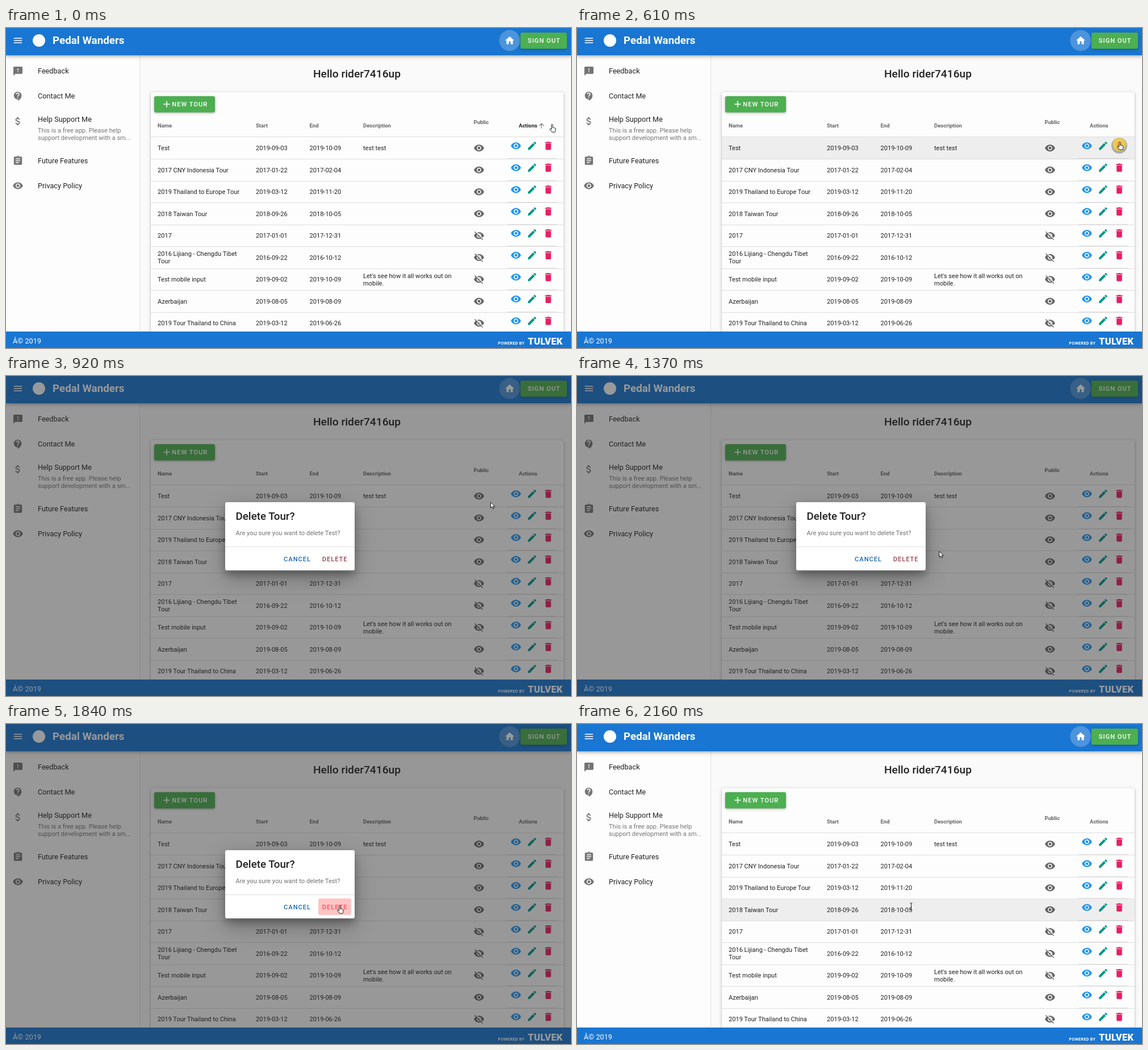
These frames come from a looping animation (995x563 px, 2.36 s). An HTML page:

```html
<!DOCTYPE html>
<html lang="en">
<head>
<meta charset="utf-8">
<title>Tour list</title>
<style>
html, body { margin: 0; width: 100%; height: 100%; overflow: hidden; background: #fafafa; }
svg { display: block; width: 995px; height: 563px; font-family: Roboto, Arial, sans-serif; }
text { white-space: pre; }
.lift { filter: drop-shadow(0 1.5px 1.5px rgba(0,0,0,.22)) drop-shadow(0 1px 3px rgba(0,0,0,.14)); }
.bar { filter: drop-shadow(0 2px 2px rgba(0,0,0,.18)) drop-shadow(0 2px 4px rgba(0,0,0,.16)); }
.deep { filter: drop-shadow(0 8px 7px rgba(0,0,0,.24)) drop-shadow(0 12px 18px rgba(0,0,0,.26)); }
</style>
</head>
<body>
<svg id="stage" viewBox="0 0 995 563"></svg>
<script>
const stage = document.getElementById('stage');
const BLUE = '#1976d2', GREEN = '#4caf50', DARK = 'rgba(0,0,0,.87)', SOFT = 'rgba(0,0,0,.54)';
const LOOP = 2360, SMALL = 11.06, SHADE = 0.46;

const icons = {
  menu: 'M3 18h18v-2H3v2zm0-5h18v-2H3v2zm0-7v2h18V6H3z',
  home: 'M10 20v-6h4v6h5v-8h3L12 3 2 12h3v8z',
  plus: 'M19 13h-6v6h-2v-6H5v-2h6V5h2v6h6z',
  up: 'M4 12l1.41 1.41L11 7.83V20h2V7.83l5.58 5.59L20 12l-8-8-8 8z',
  eye: 'M12 4.5C7 4.5 2.73 7.61 1 12c1.73 4.39 6 7.5 11 7.5s9.27-3.11 11-7.5c-1.73-4.39-6-7.5-11-7.5zM12 17c-2.76 0-5-2.24-5-5s2.24-5 5-5 5 2.24 5 5-2.24 5-5 5zm0-8c-1.66 0-3 1.34-3 3s1.34 3 3 3 3-1.34 3-3-1.34-3-3-3z',
  eyeOff: 'M12 7c2.76 0 5 2.24 5 5 0 .65-.13 1.26-.36 1.83l2.92 2.92c1.51-1.26 2.7-2.89 3.43-4.75-1.73-4.39-6-7.5-11-7.5-1.4 0-2.74.25-3.98.7l2.16 2.16C10.74 7.13 11.35 7 12 7zM2 4.27l2.28 2.28.46.46C3.08 8.3 1.78 10.02 1 12c1.73 4.39 6 7.5 11 7.5 1.55 0 3.03-.3 4.38-.84l.42.42L19.73 22 21 20.73 3.27 3 2 4.27zM7.53 9.8l1.55 1.55c-.05.21-.08.43-.08.65 0 1.66 1.34 3 3 3 .22 0 .44-.03.65-.08l1.55 1.55c-.67.33-1.41.53-2.2.53-2.76 0-5-2.24-5-5 0-.79.2-1.53.53-2.2zm4.31-.78l3.15 3.15.02-.16c0-1.66-1.34-3-3-3l-.17.01z',
  pencil: 'M3 17.25V21h3.75L17.81 9.94l-3.75-3.75L3 17.25zM20.71 7.04c.39-.39.39-1.02 0-1.41l-2.34-2.34c-.39-.39-1.02-.39-1.41 0l-1.83 1.83 3.75 3.75 1.83-1.83z',
  trash: 'M6 19c0 1.1.9 2 2 2h8c1.1 0 2-.9 2-2V7H6v12zM19 4h-3.5l-1-1h-5l-1 1H5v2h14V4z',
  feedback: 'M20 2H4c-1.1 0-1.99.9-1.99 2L2 22l4-4h14c1.1 0 2-.9 2-2V4c0-1.1-.9-2-2-2zm-7 12h-2v-2h2v2zm0-4h-2V6h2v4z',
  contact: 'M11.5 2C6.81 2 3 5.81 3 10.5S6.81 19 11.5 19h.5v3c4.86-2.34 8-7 8-11.5C20 5.81 16.19 2 11.5 2zm1 14.5h-2v-2h2v2zm0-3.5h-2c0-3.25 3-3 3-5 0-1.1-.9-2-2-2s-2 .9-2 2h-2c0-2.21 1.79-4 4-4s4 1.79 4 4c0 2.5-3 2.75-3 5z',
  money: 'M11.8 10.9c-2.27-.59-3-1.2-3-2.15 0-1.09 1.01-1.85 2.7-1.85 1.78 0 2.44.85 2.5 2.1h2.21c-.07-1.72-1.12-3.3-3.21-3.81V3h-3v2.16c-1.94.42-3.5 1.68-3.5 3.61 0 2.31 1.91 3.46 4.7 4.13 2.5.6 3 1.48 3 2.41 0 .69-.49 1.79-2.7 1.79-2.06 0-2.87-.92-2.98-2.1h-2.2c.12 2.19 1.76 3.42 3.68 3.83V21h3v-2.15c1.95-.37 3.5-1.5 3.5-3.55 0-2.84-2.43-3.81-4.7-4.4z',
  list: 'M19 3h-4.18C14.4 1.84 13.3 1 12 1c-1.3 0-2.4.84-2.82 2H5c-1.1 0-2 .9-2 2v14c0 1.1.9 2 2 2h14c1.1 0 2-.9 2-2V5c0-1.1-.9-2-2-2zm-7 0c.55 0 1 .45 1 1s-.45 1-1 1-1-.45-1-1 .45-1 1-1zm2 14H7v-2h7v2zm3-4H7v-2h10v2zm0-4H7V7h10v2z'
};

const rect = (x, y, w, h, fill, more = '') =>
  `<rect x="${x}" y="${y}" width="${w}" height="${h}" fill="${fill}" ${more}/>`;
const text = (x, y, size, str, fill = DARK, more = '') =>
  `<text x="${x}" y="${y}" font-size="${size}" fill="${fill}" ${more}>${str}</text>`;
const icon = (name, cx, cy, fill = SOFT, scale = 0.8, more = '') =>
  `<path d="${icons[name]}" fill="${fill}" transform="translate(${cx - 12 * scale} ${cy - 12 * scale}) scale(${scale})" ${more}/>`;
const caps = (x, y, str, fill, more = '') =>
  text(x, y, 11.2, str, fill, `font-weight="500" letter-spacing=".95" ${more}`);

// name, start, end, public, description
const tours = [
  ['Test', '2019-09-03', '2019-10-09', 1, 'test test'],
  ['2017 CNY Indonesia Tour', '2017-01-22', '2017-02-04', 1],
  ['2019 Thailand to Europe Tour', '2019-03-12', '2019-11-20', 1],
  ['2018 Taiwan Tour', '2018-09-26', '2018-10-05', 1],
  ['2017', '2017-01-01', '2017-12-31', 0],
  ['2016 Lijiang - Chengdu Tibet|Tour', '2016-09-22', '2016-10-12', 0],
  ['Test mobile input', '2019-09-02', '2019-10-09', 0, "Let's see how it all works out on|mobile."],
  ['Azerbaijan', '2019-08-05', '2019-08-09', 1],
  ['2019 Tour Thailand to China', '2019-03-12', '2019-06-26', 0]
];
const ROW = 38.5, TOP = 192;

function cell(x, mid, str = '') {
  const lines = str.split('|');
  return lines.map((s, i) => text(x, mid + 4 + (i - (lines.length - 1) / 2) * 13.4, SMALL, s)).join('');
}

function tourRow([name, start, end, open, note], i) {
  const y = TOP + i * ROW, mid = y + 19.2;
  return rect(255, y, 727, ROW, '#eee', `id="row${i}" opacity="0"`) +
    rect(255, Math.round(y + ROW - 0.5), 727, 1, 'rgba(0,0,0,.12)') +
    rect(883, Math.round(y + ROW - 1.5), 87, 1, 'rgba(0,0,0,.12)') +
    cell(267, mid, name) + cell(440, mid, start) + cell(534.5, mid, end) + cell(629, mid, note) +
    icon(open ? 'eye' : 'eyeOff', 833, mid, 'rgba(0,0,0,.6)') +
    (i ? '' : '<circle id="halo" cx="955" cy="207" r="14"/>') +
    icon('eye', 898, mid - 4, '#2196f3') + icon('pencil', 926.5, mid - 4, '#009688') +
    icon('trash', 955, mid - 4, '#e91e63');
}

const head = (x, y, str, more) => text(x, y, 9.5, str, 'rgba(0,0,0,.6)', `font-weight="700" ${more || ''}`);

const sidebar = rect(0, 47, 235, 487, '#fdfdfd') + rect(235, 47, 1, 487, '#e0e0e0') +
  [['feedback', 'Feedback', 76], ['contact', 'Contact Me', 120], ['money', 'Help Support Me', 164, -3],
   ['list', 'Future Features', 233.5], ['eye', 'Privacy Policy', 277.5]]
    .map(([name, str, y, dy = 0]) => icon(name, 21, y) + text(56, y + 4.2 + dy, 12.7, str)).join('') +
  text(56, 184, SMALL, 'This is a free app. Please help', SOFT) +
  text(56, 197, SMALL, 'support development with a sm...', SOFT);

const card = rect(255, 113, 727, 440, '#fdfdfd', 'rx="3" class="lift"') +
  rect(261, 120, 107, 28.5, GREEN, 'rx="3" class="lift"') +
  icon('plus', 283, 134, '#fff') + caps(292.3, 138.1, 'NEW TOUR', '#fff') +
  head(267, 175, 'Name') + head(440, 175, 'Start') + head(534.5, 175, 'End') +
  head(629, 175, 'Description') + head(823.5, 169, 'Public') +
  head(903, 175, 'Actions', 'id="sortText"') + icon('up', 943, 172, SOFT, 0.6, 'id="sortArrow"') +
  rect(255, 191, 727, 1, 'rgba(0,0,0,.12)') + tours.map(tourRow).join('');

const bars = rect(0, 0, 995, 48, BLUE, 'class="bar"') + icon('menu', 21, 22, '#fff') +
  '<circle cx="58" cy="22" r="11" fill="#fff"/>' +
  text(82, 28, 18.8, 'Pedal Wanders', '#fff', 'font-weight="700"') +
  '<circle cx="887" cy="22" r="18.5" fill="#fff" opacity=".22"/>' + icon('home', 887, 22, '#fff') +
  rect(906, 8, 82, 28.5, GREEN, 'rx="3" class="lift"') + caps(918.8, 26.3, 'SIGN OUT', '#fff') +
  rect(0, 534, 995, 29, BLUE) + text(12, 554.8, 12.7, 'Â© 2019', '#fff') +
  text(866.5, 556.5, 7.1, 'POWERED BY', '#fff', 'font-weight="700" letter-spacing=".35"') +
  text(919, 556.5, 16.6, 'TULVEK', '#fff', 'font-weight="900" letter-spacing=".3"');

const dialog = '<g id="dialog">' + rect(386, 222, 228, 120, '#fff', 'rx="3" class="deep"') +
  text(404.5, 253, 18.8, 'Delete Tour?', DARK, 'font-weight="500"') +
  text(404.5, 280, 11.15, 'Are you sure you want to delete Test?', 'rgba(0,0,0,.56)') +
  rect(386, 300, 228, 1, 'rgba(0,0,0,.12)') +
  rect(550, 307, 58, 29, '#ff5252', 'id="press" rx="3"') +
  caps(489, 325.7, 'CANCEL', '#1a67b5') + caps(556.7, 325.7, 'DELETE', '#98414c', 'id="confirm"') + '</g>';

const cursors = `<circle id="click" cx="955" cy="205" r="11.5" fill="#fdd835" opacity=".75"/>
  <g stroke="#000" stroke-width=".9" stroke-linejoin="round" fill="#fff">
  <path id="hand" d="M3.6 9.4V1.6a1.1 1.1 0 0 1 2.2 0V6.3q1.2-.6 1.8.3 1.2-.4 1.7.5 1.6-.3 1.6 1.3v2.4q0 1.5-1.2 3.4H4.6Q3 11.8 1 9.8q-.9-1.2.3-1.6.9-.2 2.3 1.2z"/>
  <path id="arrow" d="M.5.5V10.6L2.9 8.4 4.6 12.2 6.3 11.4 4.6 7.8H7.8z"/>
  <path id="beam" d="M-2-6H-.6L0-5.5.6-6H2M0-5.5V5.5M-2 6H-.6L0 5.5.6 6H2" fill="none"/></g>`;

stage.innerHTML = rect(0, 0, 995, 563, '#fafafa') + sidebar +
  text(618, 87, 19.2, 'Hello rider7416up', DARK, 'font-weight="500" text-anchor="middle"') +
  card + bars + rect(0, 0, 995, 563, '#212121', 'id="shade"') + dialog + cursors;

const part = id => document.getElementById(id);
const fade = (id, v) => part(id).setAttribute('opacity', v);

const steps = [
  { t: 0, cur: 'hand', x: 957, y: 169, sort: 1 },
  { t: 140, cur: 'hand', x: 957, y: 177, sort: 1 },
  { t: 290, cur: 'hand', x: 952, y: 198, sort: 0.5, row0: 1, halo: 0.12 },
  { t: 450, cur: 'hand', x: 951, y: 200, row0: 1, halo: 0.14 },
  { t: 610, cur: 'hand', x: 951, y: 200, row0: 1, halo: 0.28, click: 1 },
  { t: 760, cur: 'arrow', x: 955, y: 200, halo: 0.25, shade: 0.39, open: 0.84, scale: 0.914 },
  { t: 920, cur: 'arrow', x: 853, y: 221.5, shade: SHADE, open: 1 },
  { t: 1070, cur: 'arrow', x: 754, y: 265.5, shade: SHADE, open: 1 },
  { t: 1220, cur: 'arrow', x: 640, y: 307, shade: SHADE, open: 1 },
  { t: 1370, cur: 'arrow', x: 637.5, y: 308, shade: SHADE, open: 1 },
  { t: 1530, cur: 'hand', x: 589, y: 315, shade: SHADE, open: 1, press: 0.08 },
  { t: 1690, cur: 'hand', x: 583, y: 319, shade: SHADE, open: 1, press: 0.1 },
  { t: 1840, cur: 'hand', x: 583, y: 319, shade: SHADE, open: 1, press: 0.34 },
  { t: 2000, cur: 'beam', x: 588.5, y: 321, shade: 0.04, row3: 0.6 },
  { t: 2160, cur: 'beam', x: 588.5, y: 321, row3: 1 }
];

function draw(ms) {
  const s = steps.filter(step => step.t <= ms).pop();
  const { sort = 0, scale = 1, press = 0 } = s;
  for (const id of ['row0', 'row3', 'halo', 'shade', 'press']) fade(id, s[id] || 0);
  fade('click', s.click ? 0.75 : 0);
  fade('dialog', s.open || 0);
  fade('sortArrow', sort);
  part('sortText').setAttribute('fill', `rgba(0,0,0,${0.6 + 0.27 * sort})`);
  part('dialog').setAttribute('transform', `translate(500 282) scale(${scale}) translate(-500 -282)`);
  part('confirm').setAttribute('fill', press ? '#f9545a' : '#98414c');
  for (const id of ['hand', 'arrow', 'beam']) {
    fade(id, id === s.cur ? 1 : 0);
    part(id).setAttribute('transform', `translate(${s.x} ${s.y})`);
  }
}

function tick(now) {
  draw(now % LOOP);
  requestAnimationFrame(tick);
}
draw(0);
requestAnimationFrame(tick);
</script>
</body>
</html>
```
